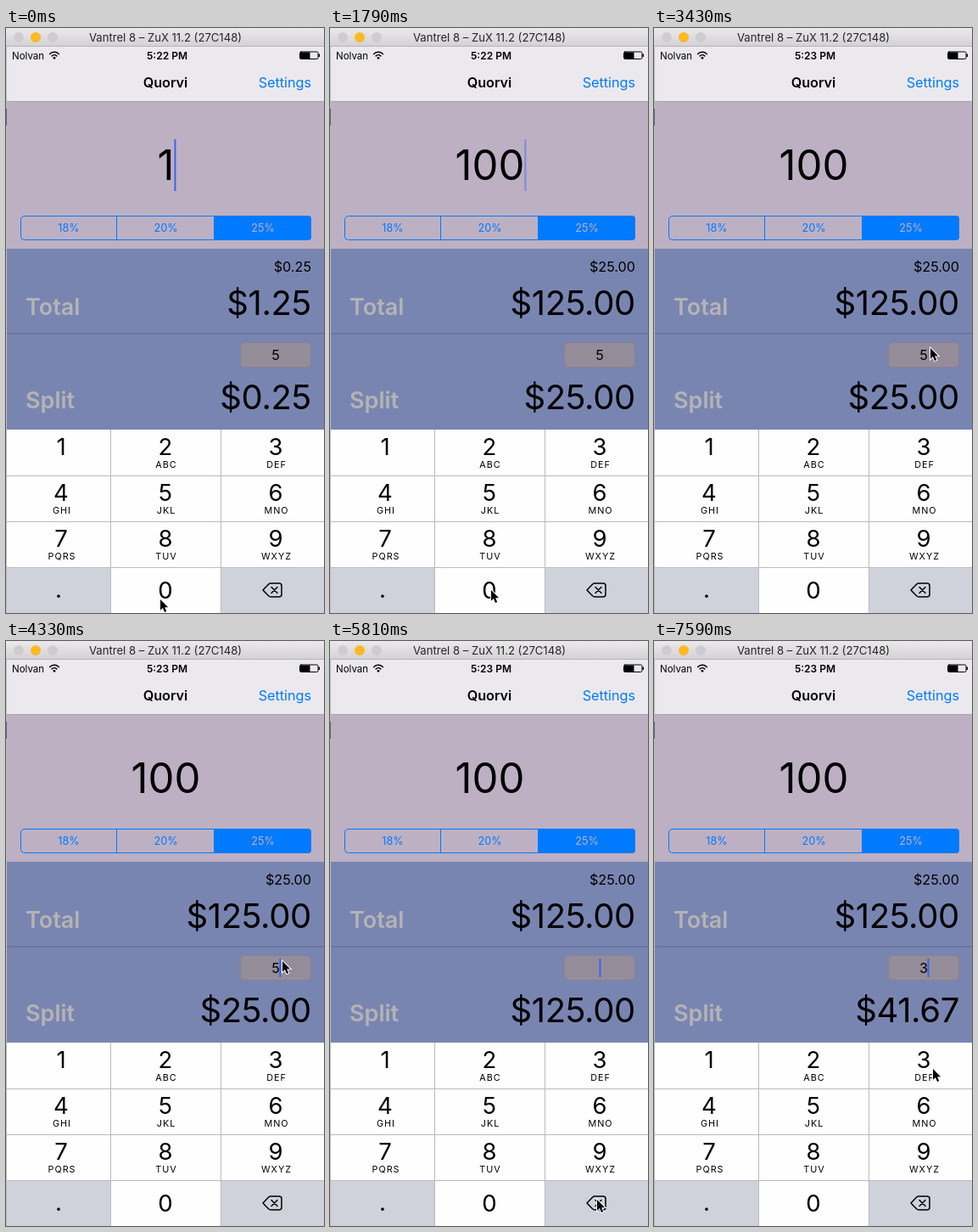
Write an HTML page with a canvas that moves like this. It is 375 px wide and 689 px high and loops after 8 s.

```html
<!DOCTYPE html>
<html lang="en">
<head>
<meta charset="utf-8">
<title>Tip calculator</title>
<style>
  html, body { margin: 0; width: 100%; height: 100%; overflow: hidden; }
  canvas { display: block; width: 375px; height: 689px; }
</style>
</head>
<body>
<canvas></canvas>
<script>
const W = 375, H = 689, LOOP = 8000, STEP = 148.5;
const BLUE = '#007aff', PINK = '#bdb0c3', INK = '#000', CARET = '#3b63ee';
const NEXT_MINUTE = 2670, FOCUS_SPLIT = 4300, DELETE = 5640, TYPE_THREE = 7570;
const canvas = document.querySelector('canvas');
const ctx = canvas.getContext('2d');
const dpr = window.devicePixelRatio || 1;
canvas.width = W * dpr;
canvas.height = H * dpr;
ctx.scale(dpr, dpr);

const clamp = v => Math.min(1, Math.max(0, v));
const ease = u => u * u * (3 - 2 * u);
const money = n => '$' + n.toFixed(2);

// Pointer strokes: start time, end time, destination.
const strokes = [
  [0, 290, 190, 662],
  [2540, 2820, 293, 422],
  [2980, 3410, 326, 377],
  [4310, 4750, 318, 671],
  [4900, 5200, 315, 658],
  [6260, 6930, 257, 606],
  [6930, 7420, 329, 504]
];

function pointerAt(t) {
  let x = 182, y = 673;
  for (const [start, end, toX, toY] of strokes) {
    const k = ease(clamp((t - start) / (end - start)));
    x += (toX - x) * k;
    y += (toY - y) * k;
  }
  return [x, y];
}

// The caret stays solid after each input, then blinks softly.
function caretAlpha(t) {
  const inputs = [-600, 590, FOCUS_SPLIT, 4690, DELETE, TYPE_THREE];
  const age = t - inputs.findLast(start => start <= t);
  return age < 700 ? 1 : clamp(.8 - 1.2 * Math.cos(2 * Math.PI * (age - 990) / 970));
}

function rect(x, y, w, h, color) {
  ctx.fillStyle = color;
  ctx.fillRect(x, y, w, h);
}

function disc(x, y, r, color) {
  ctx.fillStyle = color;
  ctx.beginPath();
  ctx.arc(x, y, r, 0, 7);
  ctx.fill();
}

function box(x, y, w, h, r, fill, stroke) {
  ctx.beginPath();
  ctx.roundRect(x, y, w, h, r);
  if (fill) { ctx.fillStyle = fill; ctx.fill(); }
  if (stroke) { ctx.strokeStyle = stroke; ctx.lineWidth = 1; ctx.stroke(); }
}

function line(d, width) {
  ctx.strokeStyle = INK;
  ctx.lineWidth = width;
  ctx.stroke(new Path2D(d));
}

// Returns the advance width.
function text(str, x, y, size, { align = 'center', color = INK, weight = 400, gap = 0 } = {}) {
  ctx.font = `${weight} ${size}px Inter, "Open Sans", sans-serif`;
  ctx.letterSpacing = gap + 'px';
  ctx.textAlign = align;
  ctx.fillStyle = color;
  ctx.fillText(str, x, y);
  return ctx.measureText(str).width;
}

function drawBars(time) {
  const bar = ctx.createLinearGradient(0, 0, 0, 21);
  bar.addColorStop(0, '#ebe9eb');
  bar.addColorStop(1, '#d4d2d4');
  rect(0, 0, W, 21, bar);
  rect(0, 21, W, 1, '#b5b3b6');
  ['#cecccf', '#fdb924', '#cecccf'].forEach((c, i) => disc(15 + 20 * i, 11, 6, c));
  text('Vantrel 8 – ZuX 11.2 (27C148)', 188, 16, 13.1, { color: '#262626' });

  rect(0, 22, W, 64, '#ebe9ee');
  rect(0, 86, W, 1, '#aaa6ae');
  text('Nolvan', 7, 36.5, 11.5, { align: 'left' });
  disc(57, 35.3, 1.4, INK);
  ctx.strokeStyle = INK;
  ctx.lineWidth = 1.6;
  for (const r of [3.8, 7.2]) {
    ctx.beginPath();
    ctx.arc(57, 35.5, r, -Math.PI * .76, -Math.PI * .24);
    ctx.stroke();
  }
  text(time, 190, 36.5, 12, { weight: 600 });
  box(346.5, 28, 21.5, 8.5, 1.5, null, INK);
  rect(347, 28.5, 11.5, 7.5, INK);
  rect(368.5, 30.5, 1.5, 3.5, INK);
  text('Quorvi', 188, 70, 16.2, { weight: 600 });
  text('Settings', 360, 70, 16.2, { align: 'right', color: BLUE });
}

function drawSegments() {
  box(17.5, 221.5, 342, 28, 4, null, BLUE);
  box(245, 221, 115, 29, [0, 4, 4, 0], BLUE);
  rect(130, 222, 1, 27, BLUE);
  ['18%', '20%', '25%'].forEach((s, i) =>
    text(s, 74 + 114.5 * i, 240.3, 12.6, { color: i === 2 ? PINK : BLUE }));
}

function drawKeypad() {
  const edge = '#b9bbc0', columns = [65, 188, 318];
  rect(0, 473, W, 216, '#fefefe');
  rect(0, 635, 123, 54, '#cfd2da');
  rect(254, 635, 121, 54, '#cfd2da');
  for (const y of [527, 581, 635]) rect(0, y, W, 1, edge);
  for (const x of [123, 253]) rect(x, 473, 1, 216, edge);
  ',ABC,DEF,GHI,JKL,MNO,PQRS,TUV,WXYZ'.split(',').forEach((letters, i) => {
    const x = columns[i % 3], y = 503 + 54 * Math.floor(i / 3);
    text(i + 1, x, y, 27.5);
    text(letters, x + 1, y + 15, 10.8, { gap: 1 });
  });
  text('.', 62, 671, 27.5);
  text('0', 188, 672, 27.5);
  ctx.lineJoin = ctx.lineCap = 'round';
  line('M303 662 L309.5 655.2 Q310.7 654 312.5 654 H322 Q325 654 325 657 V667' +
    ' Q325 670 322 670 H312.5 Q310.7 670 309.5 668.8 Z', 1.5);
  line('M313 658.5 L320 665.5 M320 658.5 L313 665.5', 1.5);
}

function drawPointer(x, y) {
  const arrow = new Path2D('M0 0 V14.5 L3.3 11.4 L5.7 17 L8.2 15.9 L5.8 10.4 H10.4 Z');
  ctx.save();
  ctx.translate(x, y);
  ctx.scale(.88, .88);
  ctx.lineJoin = 'miter';
  ctx.strokeStyle = '#fff';
  ctx.lineWidth = 2.2;
  ctx.stroke(arrow);
  ctx.fillStyle = INK;
  ctx.fill(arrow);
  ctx.restore();
}

function draw(t) {
  const amount = t < 590 ? 1 : t < 740 ? 10 : 100;
  const count = t < DELETE ? '5' : t < TYPE_THREE ? '' : '3';
  const total = amount * 1.25;
  const big = { align: 'right', gap: -.35 };
  const label = { align: 'left', weight: 600, color: '#b5b4b4' };

  drawBars(t < NEXT_MINUTE ? '5:22 PM' : '5:23 PM');
  rect(0, 87, W, 173, PINK);
  const billWidth = text(amount, 188.5, 178.5, 49);
  drawSegments();

  rect(0, 260, W, 213, '#7985b1');
  rect(0, 359.5, W, 1, '#5c678f');
  text(money(amount * .25), 360, 286.5, 16.2, { align: 'right' });
  text('Total', 23, 338, 27, label);
  text(money(total), 360, 338.3, 40, big);
  box(276.5, 370.5, 83, 29, 4.5, '#958c9a', '#878192');
  const countWidth = text(count, 318, 390.5, 16.2);
  text('Split', 23, 447.5, 27, label);
  text(money(total / (count || 1)), 360, 449.2, 40, big);

  ctx.globalAlpha = caretAlpha(t);
  if (t < FOCUS_SPLIT) rect(188.5 + billWidth / 2, 131, 2, 61, CARET);
  else rect(317.5 + countWidth / 2, 374, 2, 22, CARET);
  ctx.globalAlpha = 1;

  drawKeypad();
  rect(0, 22, 1, H - 22, '#bdbbbe');
  rect(0, 95, 1, 20, '#69666d');
  drawPointer(...pointerAt(t));
}

// The screen refreshes in coarse steps, like a slow capture.
function tick() {
  const t = performance.now() % LOOP;
  draw(Math.floor(t / STEP) * STEP);
  requestAnimationFrame(tick);
}
tick();
</script>
</body>
</html>
```
